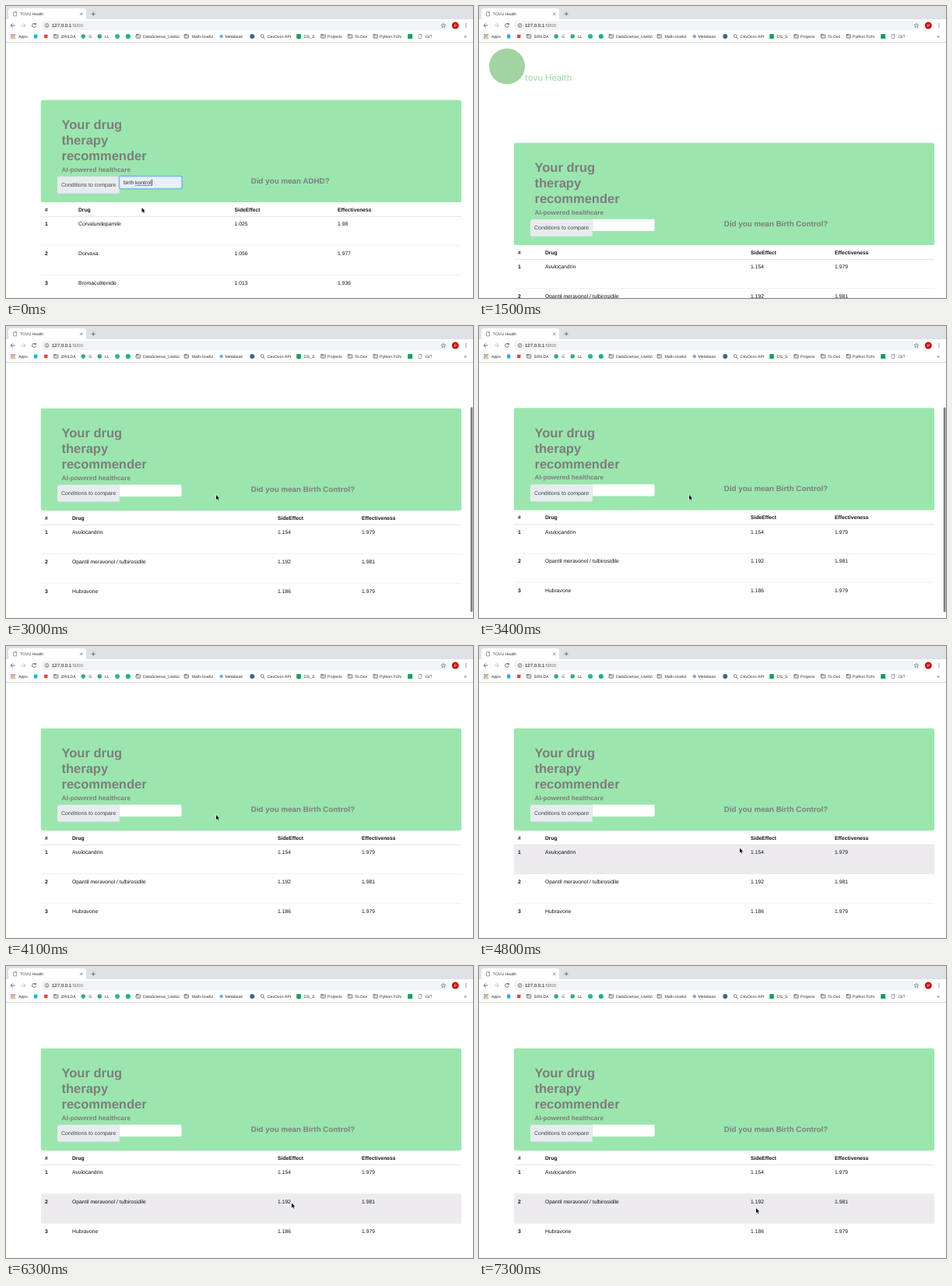
These frames come from a looping animation (600x375 px, 7.4 s). An HTML page with a canvas:

```html
<!DOCTYPE html>
<html lang="en">
<head>
<meta charset="utf-8">
<title>TOVU Health</title>
<style>
  html, body { margin: 0; width: 100%; height: 100%; overflow: hidden; background: #fff; }
  canvas { display: block; width: 600px; height: 375px; }
</style>
</head>
<body>
<canvas id="stage" width="600" height="375"></canvas>
<script>
const ctx = document.getElementById('stage').getContext('2d');
ctx.textRendering = 'geometricPrecision';
const SANS = '"Liberation Sans", Arial, sans-serif';
const LOOP = 7400, STEP = 100;
const VIEW_TOP = 47, VIEW_H = 328, DOC_H = 409;
const HEAD_Y = 325.3, ROW_H = 37.6;

const adhd = {
  cols: [50, 93, 293.5, 426],
  hint: 'Did you mean ADHD?',
  rows: [
    ['1', 'Corvalundepamile', '1.025', '1.98'],
    ['2', 'Dorvaxa', '1.056', '1.977'],
    ['3', 'Bromaculitenide', '1.013', '1.936']
  ]
};
const birth = {
  cols: [50, 85, 349, 457],
  hint: 'Did you mean Birth Control?',
  rows: [
    ['1', 'Avulocandrin', '1.154', '1.979'],
    ['2', 'Opantil meravonol / tulbirosidile', '1.192', '1.981'],
    ['3', 'Hubravone', '1.186', '1.979']
  ]
};

// time, x, y of the pointer tip
const pointerPath = [
  [2500, 174.5, 259], [2600, 225, 236], [2700, 270, 217], [4400, 270, 217],
  [4500, 284, 227], [4700, 325, 255], [4800, 335, 259.5], [5200, 344, 270],
  [6000, 365, 291.5], [6200, 365, 291.5], [6300, 367, 304.5], [6600, 369, 333],
  [6900, 369, 334], [7100, 365, 335.5], [7200, 365, 335.5], [7300, 356, 311]
];

function text(str, x, y, size, color, weight = 400, font = SANS) {
  ctx.font = `${weight} ${size}px ${font}`;
  ctx.fillStyle = color;
  ctx.fillText(str, x, y);
}

function rect(x, y, w, h, color) {
  ctx.fillStyle = color;
  ctx.fillRect(x, y, w, h);
}

function box(x, y, w, h, r, fill, stroke, lw = 0.5) {
  ctx.beginPath();
  ctx.roundRect(x, y, w, h, r);
  if (fill) { ctx.fillStyle = fill; ctx.fill(); }
  if (stroke) { ctx.strokeStyle = stroke; ctx.lineWidth = lw; ctx.stroke(); }
}

function disc(x, y, r, color) {
  ctx.beginPath();
  ctx.arc(x, y, r, 0, Math.PI * 2);
  ctx.fillStyle = color;
  ctx.fill();
}

function line(points, color, lw = 0.9) {
  ctx.beginPath();
  points.forEach(([x, y], i) => i ? ctx.lineTo(x, y) : ctx.moveTo(x, y));
  ctx.strokeStyle = color;
  ctx.lineWidth = lw;
  ctx.stroke();
}

function ring(x, y, r, color, lw, from = 0, to = Math.PI * 2) {
  ctx.beginPath();
  ctx.arc(x, y, r, from, to);
  ctx.strokeStyle = color;
  ctx.lineWidth = lw;
  ctx.stroke();
}

function folder(x) {
  box(x, 36.8, 5.6, 4.4, 0.6, '#d5d7da', '#5f6368', 0.7);
  rect(x, 36.2, 2.5, 1.2, '#5f6368');
}

function sheet(x, y) {
  box(x - 1.9, y - 2.6, 3.8, 5.2, 0.4, '#fff', '#5f6368', 0.6);
  rect(x + 0.6, y - 2.6, 1.3, 1.5, '#8a8d91');
}

function arrow(x, dir, color) {
  line([[x - 2.7, 25], [x + 2.7, 25]], color);
  line([[x + dir * 0.1, 22.3], [x + dir * 2.8, 25], [x + dir * 0.1, 27.7]], color);
}

function drawTabs() {
  rect(0, 0, 600, 17, '#dee1e6');
  box(3, 3, 100, 16, [3.5, 3.5, 0, 0], '#fff');
  sheet(11.5, 10.2);
  text('TOVU Health', 18, 12, 5.1, '#33373b');
  line([[95.2, 8.6], [98.4, 11.8]], '#5f6368', 0.7);
  line([[98.4, 8.6], [95.2, 11.8]], '#5f6368', 0.7);
  line([[109.7, 10.2], [114.7, 10.2]], '#5f6368', 0.9);
  line([[112.2, 7.7], [112.2, 12.7]], '#5f6368', 0.9);
}

function drawToolbar() {
  rect(0, 17, 600, 30, '#fff');
  arrow(8.8, -1, '#5f6368');
  arrow(22.3, 1, '#babcbe');
  ring(36, 25, 2.5, '#5f6368', 0.9, 0.2, 5.4);
  rect(36.6, 22.2, 2.2, 2, '#5f6368');

  box(45, 19, 523, 12, 6, '#f1f3f4');
  ring(52.5, 25, 2.4, '#5f6368', 0.7);
  rect(52.1, 24.6, 0.8, 1.9, '#5f6368');
  rect(52.1, 23.3, 0.8, 0.8, '#5f6368');
  text('127.0.0.1', 59, 27.2, 6, '#111');
  const host = ctx.measureText('127.0.0.1').width;
  text(':5000', 59 + host, 27.2, 6, '#70757a');

  const star = [];
  for (let i = 0; i <= 10; i++) {
    const a = -Math.PI / 2 + i * Math.PI / 5, r = i % 2 ? 1.3 : 2.9;
    star.push([562 + r * Math.cos(a), 25.2 + r * Math.sin(a)]);
  }
  line(star, '#5f6368', 0.6);
  disc(577.3, 25, 4.5, '#c4161c');
  text('P', 575.8, 26.7, 4.8, '#fff');
  for (const y of [22.8, 25, 27.2]) disc(591, y, 0.65, '#5f6368');
}

function drawBookmarks() {
  const dots = ['#ea4335', '#34a853', '#4285f4', '#fbbc05'];
  for (let i = 0; i < 9; i++)
    rect(6.2 + i % 3 * 2.1, 36.2 + Math.floor(i / 3) * 2.1, 1.5, 1.5, dots[(i * 2 + (i > 4)) % 4]);

  for (const x of [61.3, 167, 229, 404.7, 439.4, 472]) folder(x);
  box(36, 36.6, 4.2, 4.8, 0.4, '#24aee6');
  box(49, 36.8, 4.4, 4.4, 0.4, '#df4a43');
  disc(99.2, 39, 2.7, '#35a98c');
  disc(120.2, 39, 2.7, '#35a98c');
  disc(143, 39, 3, '#2fb3a4');
  disc(156.8, 39, 3, '#12b76a');
  disc(276.8, 39, 2.3, '#78aee4');
  disc(316.3, 39, 2.9, '#336791');
  ring(329.2, 38.5, 2, '#5f6368', 0.8);
  line([[330.6, 40], [332.5, 41.9]], '#5f6368', 0.9);
  box(373.3, 36, 5.6, 6, 0.5, '#16a05d');
  box(516.2, 36, 6, 6, 0.6, '#16a05d');
  sheet(532, 39);

  const labels = [
    ['Apps', 16], ['BRILDA', 71], ['G', 106.3], ['LL', 127],
    ['DataScience_Useful', 176], ['Math-Useful', 238.5], ['Metabase', 281.5],
    ['DevDocs API', 336], ['DS_S', 383], ['Projects', 413], ['To-Dos', 448],
    ['Python.FUN', 480], ['GIT', 539]
  ];
  for (const [label, x] of labels) text(label, x, 40.8, 5.15, '#2c2f33');
  text('»', 588.6, 40.8, 6, '#2c2f33');
  rect(0, 46, 600, 0.8, '#d2d4d7');
}

function drawForm(focused, caret) {
  box(66, 274, 79.8, 21.8, [2, 0, 0, 2], '#e9ecef', '#d3dade', 0.4);
  text('Conditions to compare', 71, 287.3, 7, '#3f454b');
  if (!focused) {
    box(145.9, 273.7, 79.7, 15.2, [0, 2, 2, 0], '#fff');
    return;
  }
  box(145.3, 273.5, 81, 16.2, 2, null, 'rgba(70,150,240,0.55)', 1.5);
  box(146, 274, 79.7, 15.2, [0, 2, 2, 0], '#e8f0fe', '#80bdff', 0.6);
  text('birth kontrol', 151, 283.8, 6.8, '#22262a');
  rect(166, 285, 21, 0.6, '#4a4a50');
  if (caret) rect(187.2, 277.6, 0.7, 8, '#111');
}

function drawTable(data, hover) {
  const ink = '#111417', rule = '#dee2e6';
  ['#', 'Drug', 'SideEffect', 'Effectiveness'].forEach((h, i) =>
    text(h, data.cols[i], 318.6, 6.75, ink, 700));
  data.rows.forEach((row, r) => {
    const y = HEAD_Y + r * ROW_H;
    if (r === hover) rect(45, y, 540, ROW_H, '#edebee');
    row.forEach((cell, i) =>
      text(cell, data.cols[i], y + 12, 6.8, ink, i ? 400 : 700));
    rect(45, y - 0.4, 540, r ? 0.5 : 0.9, rule);
  });
}

function drawPage(data, scroll, hover, focused, caret) {
  ctx.save();
  ctx.beginPath();
  ctx.rect(0, VIEW_TOP, 600, VIEW_H);
  ctx.clip();
  ctx.translate(0, -scroll);

  disc(36, 77.5, 23, '#a2d3a2');
  text('tovu Health', 59.3, 96.3, 11.1, '#98d8a8', 400, 'Inter, sans-serif');

  box(44.8, 175.8, 540.3, 131.3, 2.5, '#9be6ae');
  ['Your drug', 'therapy', 'recommender'].forEach((s, i) =>
    text(s, 71.5, 213 + i * 20, 16.5, '#7c7d7d', 700));
  text('AI-powered healthcare', 71.5, 267.8, 8.25, '#7c7d7d', 700);
  text(data.hint, 314.8, 282.8, 9.8, '#7c7d7d', 700);
  drawForm(focused, caret);
  drawTable(data, hover);
  ctx.restore();
}

function drawScrollbar(scroll, alpha) {
  const k = VIEW_H / DOC_H;
  ctx.globalAlpha = alpha;
  box(596.8, VIEW_TOP + 1 + scroll * k, 2.7, VIEW_H * k, 1.3, '#7d7d7d');
  ctx.globalAlpha = 1;
}

function drawPointer([x, y]) {
  const shape = [[0, 0], [0, 6], [1.4, 4.8], [2.4, 7], [3.4, 6.5], [2.4, 4.4], [4.2, 4.3]];
  ctx.beginPath();
  shape.forEach(([dx, dy]) => ctx.lineTo(x + dx, y + dy));
  ctx.closePath();
  ctx.lineJoin = 'round';
  ctx.strokeStyle = '#fff';
  ctx.lineWidth = 1;
  ctx.stroke();
  ctx.fillStyle = '#111';
  ctx.fill();
}

function pointerAt(t) {
  if (t < 1000) return [174.5, 259];
  if (t < 2500) return null;
  for (let i = 1; i < pointerPath.length; i++) {
    const [t0, x0, y0] = pointerPath[i - 1], [t1, x1, y1] = pointerPath[i];
    if (t <= t1) {
      const p = (t - t0) / (t1 - t0);
      return [x0 + (x1 - x0) * p, y0 + (y1 - y0) * p];
    }
  }
  return [356, 311];
}

const unit = v => Math.min(1, Math.max(0, v));

// ease out, then a faint overshoot that settles back
function scrollAt(t) {
  if (t < 1000) return 55;
  const p = unit((t - 2800) / 200);
  return 70 * (1 - (1 - p) ** 2) + 0.5 * Math.sin(Math.PI * unit((t - 3000) / 800));
}

function draw(t) {
  const typing = t < 1000;
  const scroll = scrollAt(t);
  const tip = pointerAt(t);
  const hover = tip ? Math.floor((tip[1] + scroll - HEAD_Y) / ROW_H) : -1;

  rect(0, 0, 600, 375, '#fff');
  drawPage(typing ? adhd : birth, scroll, hover, typing, t < 300 || t >= 800);
  drawTabs();
  drawToolbar();
  drawBookmarks();
  if (t >= 2900 && t < 4000) drawScrollbar(scroll, unit((4000 - t) / 400));
  if (tip) drawPointer(tip);
}

const start = performance.now();
function tick() {
  const t = (performance.now() - start) % LOOP;
  draw(Math.floor(t / STEP) * STEP);
  requestAnimationFrame(tick);
}
tick();
</script>
</body>
</html>
```
